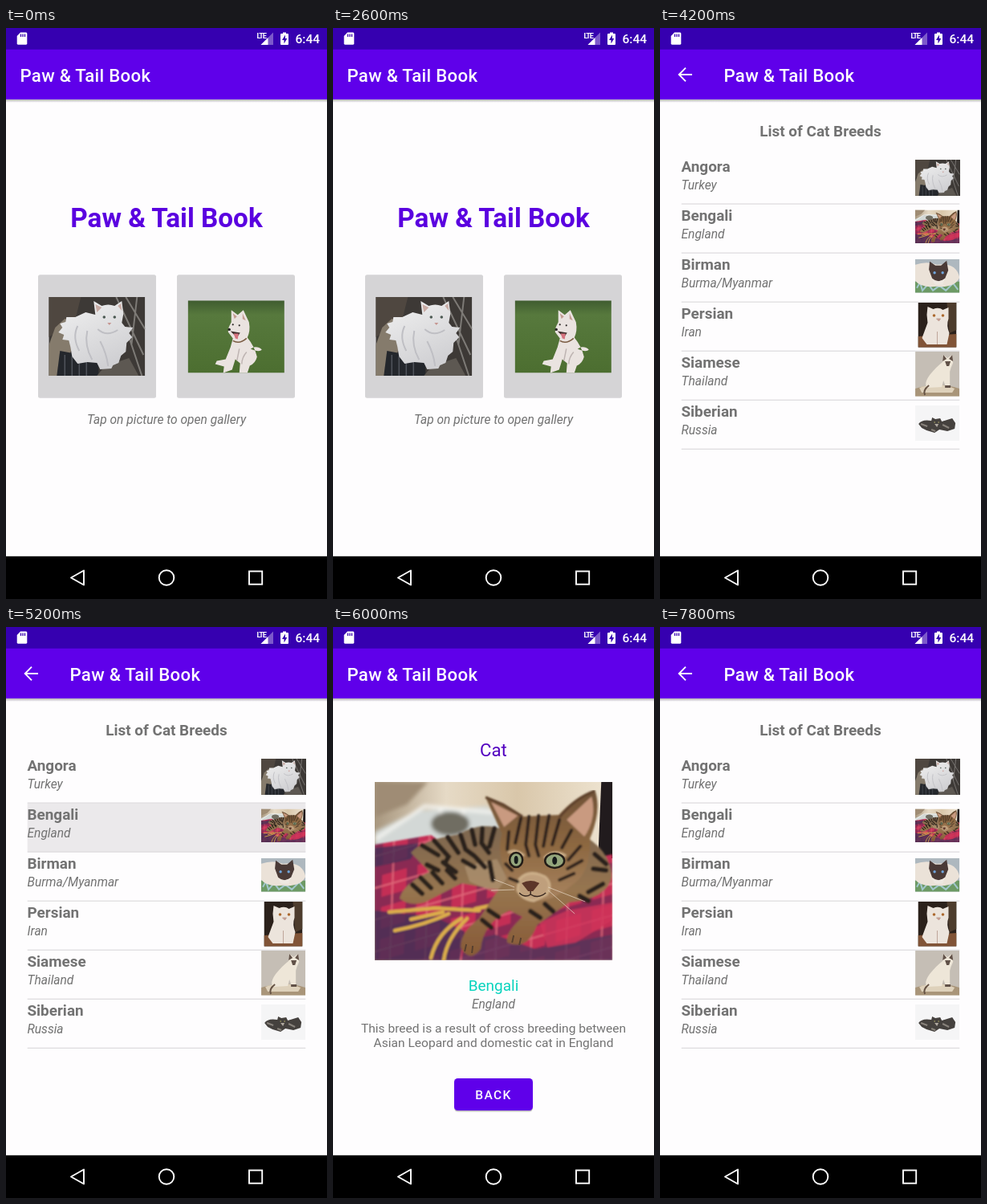
Animation, 400 px wide and 711 px high, one loop 8 s. Source, as an HTML page:

```html
<!DOCTYPE html>
<html lang="en">
<head>
<meta charset="utf-8">
<title>Paw &amp; Tail Book</title>
<style>
  html, body { margin: 0; width: 100%; height: 100%; overflow: hidden; background: #000; }
  svg#stage { display: block; width: 100vw; height: 100vh; }
  text { font-family: Roboto, sans-serif; font-size: 15.55px; fill: #727272; }
  .mid { text-anchor: middle; }
  .bold { font-weight: 700; font-size: 18.9px; }
  .it { font-style: italic; }
  .bar { font-weight: 500; font-size: 22.2px; letter-spacing: .28px; fill: #fff; }
  .line { fill: none; stroke: #fff; stroke-width: 1.9; }

  #list, #detail, #press, #ripple, #lift { opacity: 0; animation: 8s step-end infinite; }
  #press { animation-name: press; }
  #list { animation-name: open-list; }
  #ripple { animation-name: ripple; }
  #detail { animation-name: open-detail; }
  #lift { animation-name: lift; }

  @keyframes press { 0% { opacity: 0 } 35% { opacity: .09 } 40%, 100% { opacity: 0 } }
  @keyframes open-list {
    0% { opacity: 0 }
    37.5% { opacity: .65; transform: translateY(16px) }
    40%, 100% { opacity: 1; transform: none }
  }
  @keyframes ripple {
    0% { opacity: 0 }
    62.5% { opacity: .5 }
    65% { opacity: 1 }
    72.5%, 100% { opacity: 0 }
  }
  @keyframes open-detail {
    0% { opacity: 0 }
    70% { opacity: .65; transform: translateY(16px) }
    72.5% { opacity: 1; transform: none }
    92.5%, 100% { opacity: 0 }
  }
  @keyframes lift { 0% { opacity: 0 } 90% { opacity: 1 } 92.5%, 100% { opacity: 0 } }
</style>
</head>
<body>
<svg id="stage" viewBox="0 0 400 711" xmlns="http://www.w3.org/2000/svg">
  <defs>
    <linearGradient id="shade" x2="0" y2="1">
      <stop stop-color="#000" stop-opacity=".3"/><stop offset="1" stop-color="#000" stop-opacity="0"/>
    </linearGradient>
    <linearGradient id="lawn" x2="0" y2="1">
      <stop stop-color="#3f5c30"/><stop offset=".2" stop-color="#57793d"/><stop offset="1" stop-color="#4c6e30"/>
    </linearGradient>
    <linearGradient id="room">
      <stop stop-color="#a8977f"/><stop offset=".3" stop-color="#e6dac6"/><stop offset=".6" stop-color="#d9c7aa"/><stop offset="1" stop-color="#efe5d3"/>
    </linearGradient>
    <linearGradient id="coat" x2="0" y2="1">
      <stop stop-color="#7c6650"/><stop offset=".5" stop-color="#97754f"/><stop offset="1" stop-color="#875a36"/>
    </linearGradient>
    <linearGradient id="face" x2="0" y2="1">
      <stop stop-color="#6f5136"/><stop offset=".5" stop-color="#8d6841"/><stop offset="1" stop-color="#a98460"/>
    </linearGradient>
    <linearGradient id="fur" x2=".5" y2="1">
      <stop stop-color="#f1f1f1"/><stop offset="1" stop-color="#d0d0d3"/>
    </linearGradient>
    <pattern id="plaid" width="46" height="38" patternUnits="userSpaceOnUse" patternTransform="rotate(-16) skewX(-18)">
      <rect width="46" height="38" fill="#c42d54"/>
      <path d="M0 0H14V38H0ZM0 26H46V38H0Z" fill="#5a2b52" opacity=".55"/>
      <path d="M28 0V38M0 13H46" stroke="#e0687a" stroke-width="2"/>
    </pattern>
    <filter id="soft"><feGaussianBlur stdDeviation="2.5"/></filter>
    <filter id="hazy" x="0" y="0" width="1" height="1"><feGaussianBlur stdDeviation=".8"/></filter>
    <filter id="drop"><feGaussianBlur stdDeviation="3"/></filter>

    <g id="frame">
      <rect width="400" height="711" fill="#fefdfe"/>
      <rect y="88.9" width="400" height="4" fill="url(#shade)"/>
      <rect width="400" height="88.9" fill="#5f00ea"/>
      <rect width="400" height="26.7" fill="#3600b0"/>
    </g>

    <symbol id="angora" viewBox="0 0 120 98" preserveAspectRatio="none">
      <rect width="120" height="98" fill="#3d3936"/>
      <path d="M0 0H40L34 24 12 42 0 50Z" fill="#4f4740"/>
      <path d="M0 60 8 38 20 27 32 32 30 62 14 98H0Z" fill="#857b6c"/>
      <path d="M84 0 118 72M96 0 120 40M110 0 103 60M100 50 116 98" stroke="#7d7a76" stroke-width="2" fill="none"/>
      <path d="M14 67 62 76V98H10Z" fill="#24272c"/>
      <path d="M20 72V98M29 74V98M38 76V98M47 78V98" stroke="#50545b" stroke-width="1.5"/>
      <path d="M70 86 100 76 112 98H60Z" fill="#5d5852"/>
      <path d="M58 22 56 5 66 11Q74 8 82 11L91 5 93 21 91 32 95 37 105 38 100 45 104 50 97 57 96 68 90 73 87 82 80 85 78 89 64 90 60 82 48 81 36 83 29 74 27 62 25 54 17 53 19 47 12 44 17 38 14 33 21 31 22 25 33 25 46 19Z" fill="url(#fur)"/>
      <path d="M58 9 60 19 66 13ZM86 11 90 8 91 17Z" fill="#c9aca5"/>
      <path d="M61 40Q72 50 86 41M64 55Q72 70 74 86M36 36Q29 50 38 67M48 42Q44 60 54 78" stroke="#bfbfc4" stroke-width="2" fill="none"/>
      <circle cx="69" cy="25" r="1.8" fill="#4c5a53"/><circle cx="82" cy="25" r="1.8" fill="#4c5a53"/>
      <path d="M73 32H78L75.5 35Z" fill="#c59691"/>
    </symbol>

    <symbol id="dog" viewBox="0 0 120 90" preserveAspectRatio="none">
      <rect width="120" height="90" fill="url(#lawn)"/>
      <path d="M78 60Q89 65 92 61 88 57 82 58ZM54 27 54 12 62 18 69 12 76 27Q78 38 74 46 83 57 86 70 84 78 77 81L74 90H64L65 78 59 73 55 86 44 90 45 82 34 79 36 75 47 73 53 58 56 47 50 39 51 33Z" fill="#eae3e0"/>
      <path d="M56 16 58 23 61 20ZM68 16 68 23 72 25Z" fill="#c39c92"/>
      <path d="M53 38 65 40 61 46Z" fill="#3e2d2b"/>
      <path d="M57 41H63L62 48 59 47Z" fill="#d6737f"/>
      <path d="M56 50Q64 55 73 47" stroke="#7b5c43" stroke-width="1.5" fill="none"/>
      <circle cx="51.5" cy="36" r="1.7" fill="#292525"/><circle cx="56" cy="30" r="1.1" fill="#292525"/><circle cx="64" cy="31" r="1.1" fill="#292525"/>
      <path d="M64 60 61 75M73 64Q67 71 67 79" stroke="#beb4b2" stroke-width="1.5" fill="none"/>
    </symbol>

    <symbol id="bengal" viewBox="0 0 296 222" preserveAspectRatio="none">
      <rect width="296" height="222" fill="url(#room)"/>
      <g filter="url(#soft)">
        <path d="M0 0H66L40 28 0 44Z" fill="#9f8c74"/>
        <path d="M0 62 52 36 140 30 170 60V80L0 88Z" fill="#d3d8d6"/>
        <path d="M0 72 62 30 150 38M82 34V64M110 36V60" stroke="#f5f5f1" stroke-width="4" fill="none"/>
        <ellipse cx="94" cy="52" rx="24" ry="15" fill="#706d62"/>
      </g>
      <path d="M282 0H296V95H278Z" fill="#211b1d"/>
      <g filter="url(#hazy)">
        <path d="M0 78 70 66 150 120 296 90V222H0Z" fill="url(#plaid)"/>
        <path d="M0 82 55 76 45 96 0 106ZM0 160 75 168 112 186 106 222H0Z" fill="#452f54" opacity=".8"/>
        <path d="M112 198 150 190 200 208 296 190V222H108Z" fill="#56335a" opacity=".8"/>
        <path d="M205 175 240 160 296 150V172L250 200 215 206Z" fill="#d03359" opacity=".8"/>
        <path d="M18 162 75 157 130 160M25 185Q65 177 92 164M70 219Q78 187 108 170M86 221Q90 194 115 170M45 171 85 162M125 158 158 151" stroke="#dcae4b" stroke-width="4.5" stroke-linecap="round" fill="none"/>
        <path d="M31 145Q36 126 68 112L45 88Q59 72 105 65 133 48 162 60L254 63Q294 84 295 118 290 145 242 150L202 178Q190 211 165 200 162 188 184 168L168 160Q135 175 132 208 118 226 107 206 106 188 130 170L154 134 108 126 62 150Q43 155 31 145Z" fill="url(#coat)"/>
        <path d="M112 105 152 96 165 120 150 138 118 124Z" fill="#b49a7a" opacity=".6"/>
        <path d="M59 79 79 91M74 73 92 93 88 100M91 69 104 88M107 66 113 84 124 92M121 60 125 78M134 58 133 76 142 88M149 58 143 80M65 103 79 110M85 100 101 112M110 98 124 106M126 94 137 106M47 128 59 139M57 119 70 132M72 113 84 126M90 110 100 120M143 100 147 122M142 160 154 168M134 172 145 181M194 161 206 169M212 152 222 161M266 137 284 127M272 108 288 110M274 90 288 102M255 142 266 148" stroke="#2b221b" stroke-width="6" stroke-linecap="round" fill="none"/>
        <path d="M158 64 138 19Q162 25 184 43L229 41Q251 17 274 10 283 35 268 70 270 112 246 128 226 146 203 148 188 152 178 138 163 128 160 104 153 86 158 64Z" fill="url(#face)"/>
        <path d="M145 25 161 56 178 42ZM270 18 239 47 261 68Q277 45 270 18Z" fill="#c99a80"/>
        <path d="M138 19 160 28 184 43M274 11Q248 21 230 44" fill="none" stroke="#5d402c" stroke-width="3"/>
        <path d="M166 88Q175 82 186 92M211 95Q222 83 238 92M180 121Q192 108 212 118 222 127 214 140L198 148Q181 145 178 134Z" stroke="#cdb08a" stroke-width="3" fill="#bf9f7c"/>
        <path d="M182 45 175 76M192 43 188 78 192 92M204 42 200 78 204 92M217 42 210 80M230 47 221 78M167 62 165 84M245 60 233 82M256 80 241 97M258 98 240 108M248 114 230 122M163 102 171 110M168 120 178 124" stroke="#2e231b" stroke-width="4" stroke-linecap="round" fill="none"/>
      </g>
      <path d="M183 126Q194 120 205 126L197 136H191Z" fill="#5c3529"/>
      <path d="M194 136V140Q187 145 180 138M194 140Q203 146 213 138" fill="none" stroke="#392820" stroke-width="1.5"/>
      <g stroke="#221c17" stroke-width="2.5" fill="#94a67c">
        <ellipse cx="176" cy="97" rx="8" ry="9"/><ellipse cx="224" cy="98" rx="12" ry="9"/>
      </g>
      <ellipse cx="176" cy="97" rx="2.5" ry="5" fill="#15191a"/><ellipse cx="224" cy="98" rx="3" ry="5" fill="#15191a"/>
      <path d="M216 131 262 149M216 135 249 164M174 131 148 121M174 134 145 135" stroke="#e8dac8" stroke-width=".7"/>
      <path d="M112 211 114 202M121 213 122 204M171 200 173 191M180 203 182 194" stroke="#57402f" stroke-width="2"/>
    </symbol>

    <symbol id="birman" viewBox="0 0 55 41.5">
      <rect width="55" height="42" fill="#aeb8bf"/>
      <path d="M0 28H55V42H0Z" fill="#6d9a65"/>
      <path d="M2 36 6 29 9 39 16 31 22 39 30 33 38 39 47 30 53 38" stroke="#a1c6cc" stroke-width="2" fill="none"/>
      <path d="M0 7Q15 2 27 7 51 4 55 23 49 36 27 34 7 36 0 27Z" fill="#ebe2d8"/>
      <path d="M17 13 18 3 25 8H32L39 2 41 14 37 24Q29 31 21 24Z" fill="#4a3a37"/>
      <path d="M20 25Q28 31 37 24L34 32H25Z" fill="#eee8e1"/>
      <circle cx="24" cy="17" r="1.7" fill="#70a4da"/><circle cx="34" cy="17" r="1.7" fill="#70a4da"/>
    </symbol>

    <symbol id="persian" viewBox="0 0 48 55.5">
      <rect width="48" height="56" fill="#2b211b"/>
      <path d="M0 42 48 39V56H0Z" fill="#815437"/>
      <path d="M36 0H48V34L39 38Z" fill="#4d3c2d"/>
      <path d="M11 15 12 5 19 8Q26 5 31 9L38 6 38 20Q35 28 39 38L36 52H11L5 44 12 25Z" fill="#ece4dc"/>
      <circle cx="20" cy="16" r="1.8" fill="#ac692e"/><circle cx="31" cy="16" r="1.8" fill="#ac692e"/>
      <path d="M23 20H28L26 23ZM24 36V52" stroke="#bfa69a" fill="#ce958b"/>
    </symbol>

    <symbol id="siamese" viewBox="0 0 55 55.5">
      <rect width="55" height="56" fill="#c5beb5"/>
      <path d="M0 46Q28 37 55 46V56H0Z" fill="#a99579"/>
      <path d="M5 45Q29 37 49 46L46 51H8Z" fill="#ded1bb"/>
      <path d="M34 13 35 4 40 8 46 4 47 14Q44 20 43 25L43 44H38L35 36 33 44 15 45Q10 40 18 29 26 19 34 13Z" fill="#eee6d8"/>
      <path d="M34 12 35 4 39 9ZM42 9 46 4 47 12ZM37 12H44L42 18H39ZM37 42H44V45H37Z" fill="#615148"/>
      <path d="M17 42Q9 48 12 54" stroke="#655244" stroke-width="2" fill="none"/>
    </symbol>

    <symbol id="siberian" viewBox="0 0 55 44">
      <rect width="55" height="44" fill="#f5f5f6"/>
      <path d="M4 23Q8 17 20 19L21 15 25 17 31 16 33 20 46 16 50 22 49 29 40 32 30 30 24 34 14 31 8 28Z" fill="#45413e"/>
      <path d="M7 23 15 26M34 24 42 28M20 30 25 32" stroke="#88827b" stroke-width="2"/>
      <path d="M24 23 29 23 27 27Z" fill="#b1aaa1"/>
      <circle cx="24" cy="21" r=".8" fill="#b0ad67"/><circle cx="29" cy="21" r=".8" fill="#b0ad67"/>
    </symbol>
  </defs>

  <g id="home">
    <use href="#frame"/>
    <text class="bar" x="17.5" y="66.5">Paw &amp; Tail Book</text>
    <text class="mid" x="200" y="248" style="font-size:33.3px;font-weight:700;fill:#5a00e0">Paw &amp; Tail Book</text>
    <g fill="#d5d4d6">
      <rect x="40" y="307.3" width="147" height="153.5" rx="2.5"/>
      <rect x="213" y="307.3" width="147" height="153.5" rx="2.5"/>
    </g>
    <use href="#angora" x="53.3" y="335" width="120" height="98"/>
    <use href="#dog" x="226.6" y="339.3" width="120.3" height="90.2"/>
    <rect id="press" x="40" y="307" width="147" height="154" rx="2.5"/>
    <text class="mid it" x="200" y="493">Tap on picture to open gallery</text>
  </g>

  <g id="list">
    <use href="#frame"/>
    <path class="line" d="M40 58H24M32 49.7 23.7 58 32 66.3"/>
    <text class="bar" x="79.5" y="66.5">Paw &amp; Tail Book</text>
    <text class="mid bold" x="200" y="135.3">List of Cat Breeds</text>
    <rect id="ripple" x="26.7" y="219.5" width="346.6" height="60.5" fill="#ebe9eb"/>
    <g id="rows"></g>
  </g>

  <g id="detail">
    <use href="#frame"/>
    <text class="bar" x="17.5" y="66.5">Paw &amp; Tail Book</text>
    <text class="mid" x="200" y="161" style="font-size:22.2px;fill:#5200c0">Cat</text>
    <use href="#bengal" x="52" y="193" width="296.3" height="222"/>
    <text class="mid" x="200" y="453.3" style="font-size:19px;fill:#08d3bd">Bengali</text>
    <text class="mid it" x="200" y="475">England</text>
    <text class="mid" x="200" y="504.7">This breed is a result of cross breeding between</text>
    <text class="mid" x="200" y="523">Asian Leopard and domestic cat in England</text>
    <rect id="lift" x="151" y="566" width="98" height="40" rx="4" fill="#777" filter="url(#drop)"/>
    <rect x="151" y="563.5" width="98" height="40" rx="4.5" fill="#000" opacity=".25"/>
    <rect x="151" y="562" width="98" height="40" rx="4.5" fill="#5f00ea"/>
    <text x="177.3" y="588" style="font-weight:500;letter-spacing:1.39px;fill:#fff">BACK</text>
  </g>

  <g id="status" fill="#fff">
    <path d="M18 5.5H25Q26.3 5.5 26.3 7V19.3Q26.3 20.7 25 20.7H15Q13.7 20.7 13.7 19.3V10Z"/>
    <path d="M18.5 7.5V11M21 7.5V11M23.5 7.5V11" stroke="#3600b0" stroke-width="1.3"/>
    <path d="M333 5.5V21H317.5Z" opacity=".35"/>
    <path d="M326.5 12V21H317.5Z"/>
    <rect x="311" y="4" width="13" height="9.5" fill="#3600b0"/>
    <text x="312.5" y="12.6" style="font-size:9.2px;font-weight:600;font-stretch:75%;letter-spacing:-1.3px;fill:#fff">LTE</text>
    <path d="M345 5.5H349V7H351Q352 7 352 8V20Q352 21 351 21H343Q342 21 342 20V8Q342 7 343 7H345Z"/>
    <path d="M348 8.5 344 15H346.5V19.5L350.3 13H348Z" fill="#3600b0"/>
    <text x="360.5" y="19.3" style="font-weight:500;fill:#fff">6:44</text>
  </g>
  <g id="nav">
    <rect y="657.8" width="400" height="54"/>
    <path class="line" d="M97 675.5V693.5L81 684.5Z" stroke-linejoin="round"/>
    <circle class="line" cx="200" cy="684.5" r="9.3"/>
    <rect class="line" x="303" y="676.5" width="16.2" height="16.2"/>
  </g>
</svg>
<script>
  // name, country, picture, x, y, width, height
  const breeds = [
    ["Angora", "Turkey", "angora", 318, 164, 55.3, 45],
    ["Bengali", "England", "bengal", 318, 226.5, 55.3, 41.5],
    ["Birman", "Burma/Myanmar", "birman", 318, 287.7, 55.3, 41.7],
    ["Persian", "Iran", "persian", 321.5, 342, 48, 55.5],
    ["Siamese", "Thailand", "siamese", 318, 403, 55.3, 55.5],
    ["Siberian", "Russia", "siberian", 318, 470, 55.3, 44]
  ];
  document.getElementById("rows").innerHTML = breeds.map(([name, land, pic, x, y, w, h], i) => {
    const top = i * 61.05;
    return `<text class="bold" x="26.5" y="${178.5 + top}">${name}</text>
      <text class="it" x="26.5" y="${200.7 + top}">${land}</text>
      <use href="#${pic}" x="${x}" y="${y}" width="${w}" height="${h}"/>
      <rect x="26.7" y="${218.5 + top}" width="346.6" height="1.1" fill="#d9d8da"/>`;
  }).join("");
</script>
</body>
</html>
```
